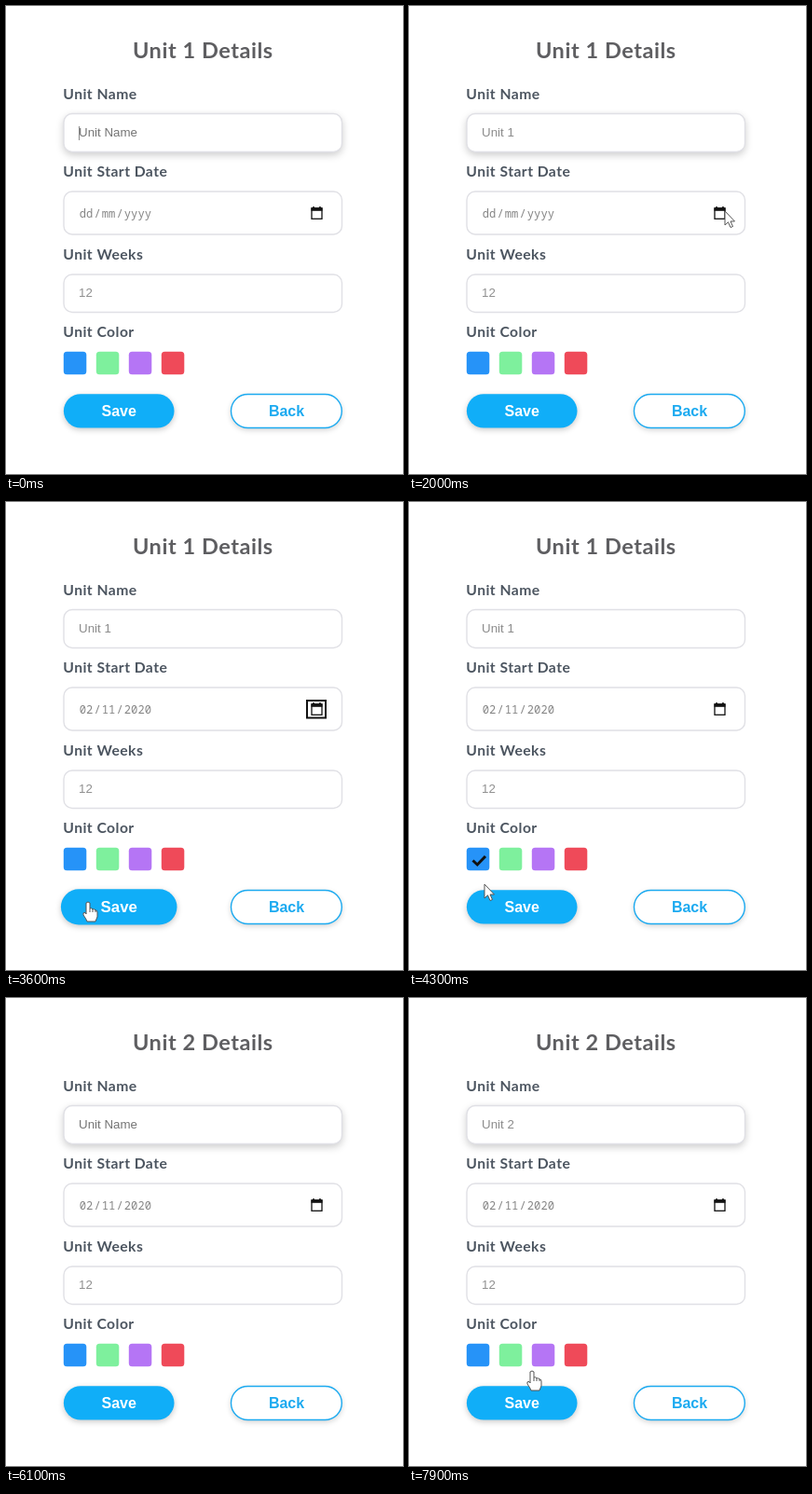
Write an HTML page with a canvas that moves like this. It is 426 px wide and 502 px high and loops after 8000 ms.

```html
<!DOCTYPE html>
<html lang="en">
<head>
<meta charset="utf-8">
<title>Unit form</title>
<style>
html, body { margin: 0; width: 100%; height: 100%; overflow: hidden; background: #fff; }
canvas { display: block; width: 426px; height: 502px; }
</style>
</head>
<body>
<canvas id="stage"></canvas>
<script>
const W = 426, H = 502, LOOP = 8000, STEP = 100;
const canvas = document.getElementById('stage');
const ctx = canvas.getContext('2d');
const dpr = window.devicePixelRatio || 1;
canvas.width = W * dpr;
canvas.height = H * dpr;

const SANS = '"Liberation Sans", Arial, sans-serif';
const HEAD = 'Lato, "Open Sans", sans-serif';
const MONO = '"Noto Sans Mono", "DejaVu Sans Mono", monospace';
const BLUE = '#10aef8';
const SWATCHES = ['#2693f8', '#7ef09d', '#b575f5', '#ef4a59'];

// Moments of the story, in ms
const PICK = 2150, DATE_SET = 2700, CHECK = 4050, SAVE = 4500, REFOCUS = 5500;
const TYPING = [{ start: 400, text: 'Unit 1' }, { start: 6500, text: 'Unit 2' }];
const KEY_GAP = 130;
const HOVERS = [[3450, 3720], [4380, 4660], [7450, 7640]];

// Pointer path: time, x, y, shape used from that time on
const POINTER = [
  [1700, 300, 212, 'arrow'], [1900, 339, 220, 'arrow'], [2150, 339, 220, 'arrow'],
  [2500, 362, 238, 'arrow'], [2650, 362, 238, ''],
  [3400, 160, 470, 'arrow'], [3500, 112, 442, 'hand'], [3600, 88, 429, 'hand'],
  [3700, 88, 429, 'hand'], [3850, 46, 460, 'arrow'], [4000, 74, 384, 'hand'],
  [4150, 74, 384, 'hand'], [4300, 81, 410, 'arrow'], [4400, 100, 430, 'hand'],
  [4600, 104, 432, 'hand'], [4900, 130, 356.5, 'hand'], [5000, 138, 345, 'arrow'],
  [5150, 146, 330, ''],
  [7300, 140, 338, 'arrow'], [7500, 112, 434, 'hand'], [7650, 114, 434, 'hand'],
  [7900, 132, 400, 'hand'], [8000, 135, 392, 'hand']
];

const ARROW = new Path2D('M0 0V15L3.5 11.8L6 17.5L8.5 16.5L6 11H10.5Z');
const HAND = new Path2D('M-2 1Q0-1 2 1V7Q4 6 5 8Q7 7 8 9Q10 8.5 10 11V16Q9 18 8 21H-1Q-2 18-5 14Q-6 11-3 11.5L-2 13Z');
const FINGERS = new Path2D('M2 7V11M5 8V11M8 9V11');

const ramp = (t, a, b) => Math.min(1, Math.max(0, (t - a) / (b - a)));
const smooth = u => u * u * (3 - 2 * u);

function text(str, x, y, font, color, align = 'left', tracking = 0) {
  ctx.font = font;
  ctx.letterSpacing = `${tracking}px`;
  ctx.fillStyle = color;
  ctx.textAlign = align;
  ctx.fillText(str, x, y);
}

function box(x, y, w, h, r, fill, stroke, shade = 0, drop = 3, blur = 8) {
  ctx.beginPath();
  ctx.roundRect(x, y, w, h, r);
  ctx.save();
  if (shade > 0) {
    ctx.shadowColor = `rgba(0,0,0,${shade})`;
    ctx.shadowOffsetY = drop * dpr;
    ctx.shadowBlur = blur * dpr;
  }
  ctx.fillStyle = fill;
  ctx.fill();
  ctx.restore();
  if (stroke) {
    ctx.strokeStyle = stroke;
    ctx.lineWidth = 1.4;
    ctx.stroke();
  }
}

const field = (y, h, shade) => box(62, y, 298.5, h, 9, '#fff', '#e0e0e5', shade);
const label = (str, y) => text(str, 61.3, y, `700 15.7px ${HEAD}`, '#4c5560', 'left', 0.45);

function nameField(t) {
  const focus = t < REFOCUS ? 1 - ramp(t, PICK, PICK + 150) : ramp(t, REFOCUS, REFOCUS + 200);
  field(115.5, 41, 0.22 * focus);

  const entry = TYPING[t < SAVE ? 0 : 1];
  const count = Math.min(entry.text.length, Math.max(0, Math.floor((t - entry.start) / KEY_GAP) + 1));
  const value = entry.text.slice(0, count);
  text(value || 'Unit Name', 78, 140, `13.333px ${SANS}`, value ? '#8b8b8b' : '#747474');

  const since = count ? entry.start + (count - 1) * KEY_GAP : t < SAVE ? 0 : REFOCUS;
  const blinkOn = Math.floor((t - since) / 500) % 2 === 0;
  if (focus > 0.5 && blinkOn) {
    ctx.fillStyle = '#8a8a8a';
    ctx.fillRect(78 + ctx.measureText(value).width, 129, 1, 15);
  }
}

function dateField(t) {
  field(199, 46, 0);
  const parts = t < DATE_SET ? ['dd', 'mm', 'yyyy'] : ['02', '11', '2020'];
  const font = `12.2px ${MONO}`;
  [78.8, 102.8, 126.8].forEach((x, i) => {
    text(parts[i], x, 227, font, '#858585');
    if (i) text('/', x - 8.3, 227, font, '#858585');
  });

  ctx.fillStyle = '#111';
  ctx.fillRect(327.5, 216.3, 12, 3.5);
  ctx.fillRect(329.3, 215, 1.5, 2);
  ctx.fillRect(336.2, 215, 1.5, 2);
  ctx.strokeStyle = '#111';
  ctx.lineWidth = 1.3;
  ctx.strokeRect(328, 217, 11, 11.3);
  if (t >= PICK && t < CHECK) {
    ctx.lineWidth = 2;
    ctx.strokeRect(323, 213, 20, 18.5);
  }
}

function swatches(t) {
  SWATCHES.forEach((c, i) => box(61.8 + 35 * i, 370.8, 24.5, 24.5, 3.5, c));
  if (t >= CHECK && t < SAVE) {
    ctx.beginPath();
    ctx.moveTo(68.5, 384.5);
    ctx.lineTo(73.3, 389);
    ctx.lineTo(82, 380);
    ctx.strokeStyle = '#111';
    ctx.lineWidth = 3;
    ctx.stroke();
  }
}

function buttons(t) {
  let hover = 0;
  for (const [a, b] of HOVERS) hover = Math.max(hover, ramp(t, a, a + 120) - ramp(t, b, b + 120));
  const focused = t >= SAVE && t < REFOCUS;
  ctx.save();
  ctx.translate(121.2, 434.4);
  ctx.scale(1 + 0.05 * hover, 1 + 0.05 * hover);
  box(-59.3, -18.2, 118.6, 36.4, 18.2, BLUE, '', focused ? 0 : 0.22, 2, 6);
  text('Save', 0, 5.1, `700 16px ${SANS}`, '#fff', 'center');
  ctx.restore();
  if (focused) {
    ctx.beginPath();
    ctx.roundRect(61.8, 416.3, 118.8, 36.2, 1);
    ctx.strokeStyle = '#111';
    ctx.lineWidth = 1.5;
    ctx.stroke();
  }
  box(241.5, 416.5, 118.8, 36, 18, '#fff', '#1caaf0', 0.2, 2, 6);
  text('Back', 301, 439.5, `700 16px ${SANS}`, '#1caaf0', 'center');
}

function pointer(t) {
  const i = POINTER.findIndex((k, n) => n + 1 < POINTER.length && t >= k[0] && t < POINTER[n + 1][0]);
  if (i < 0 || !POINTER[i][3]) return;
  const [t0, x0, y0, kind] = POINTER[i];
  const [t1, x1, y1] = POINTER[i + 1];
  const u = smooth(ramp(t, t0, t1));
  ctx.save();
  ctx.translate(x0 + (x1 - x0) * u, y0 + (y1 - y0) * u);
  const shape = kind === 'hand' ? HAND : ARROW;
  ctx.fillStyle = '#fff';
  ctx.strokeStyle = '#555';
  ctx.lineWidth = 1;
  ctx.lineJoin = 'round';
  ctx.fill(shape);
  ctx.stroke(shape);
  if (kind === 'hand') ctx.stroke(FINGERS);
  ctx.restore();
}

function draw(t) {
  ctx.setTransform(dpr, 0, 0, dpr, 0, 0);
  ctx.fillStyle = '#fff';
  ctx.fillRect(0, 0, W, H);
  text(`Unit ${t < SAVE ? 1 : 2} Details`, 136, 55.7, `700 23.5px ${HEAD}`, '#5e5e61', 'left', 0.55);
  label('Unit Name', 100);
  label('Unit Start Date', 183.3);
  label('Unit Weeks', 272);
  label('Unit Color', 355.3);
  nameField(t);
  dateField(t);
  field(288, 40.5, 0);
  text('12', 78, 312, `13.333px ${SANS}`, '#909090');
  swatches(t);
  buttons(t);
  pointer(t);
}

const origin = performance.now();
function tick() {
  const t = (performance.now() - origin) % LOOP;
  draw(Math.floor(t / STEP) * STEP);
  requestAnimationFrame(tick);
}
tick();
</script>
</body>
</html>
```
